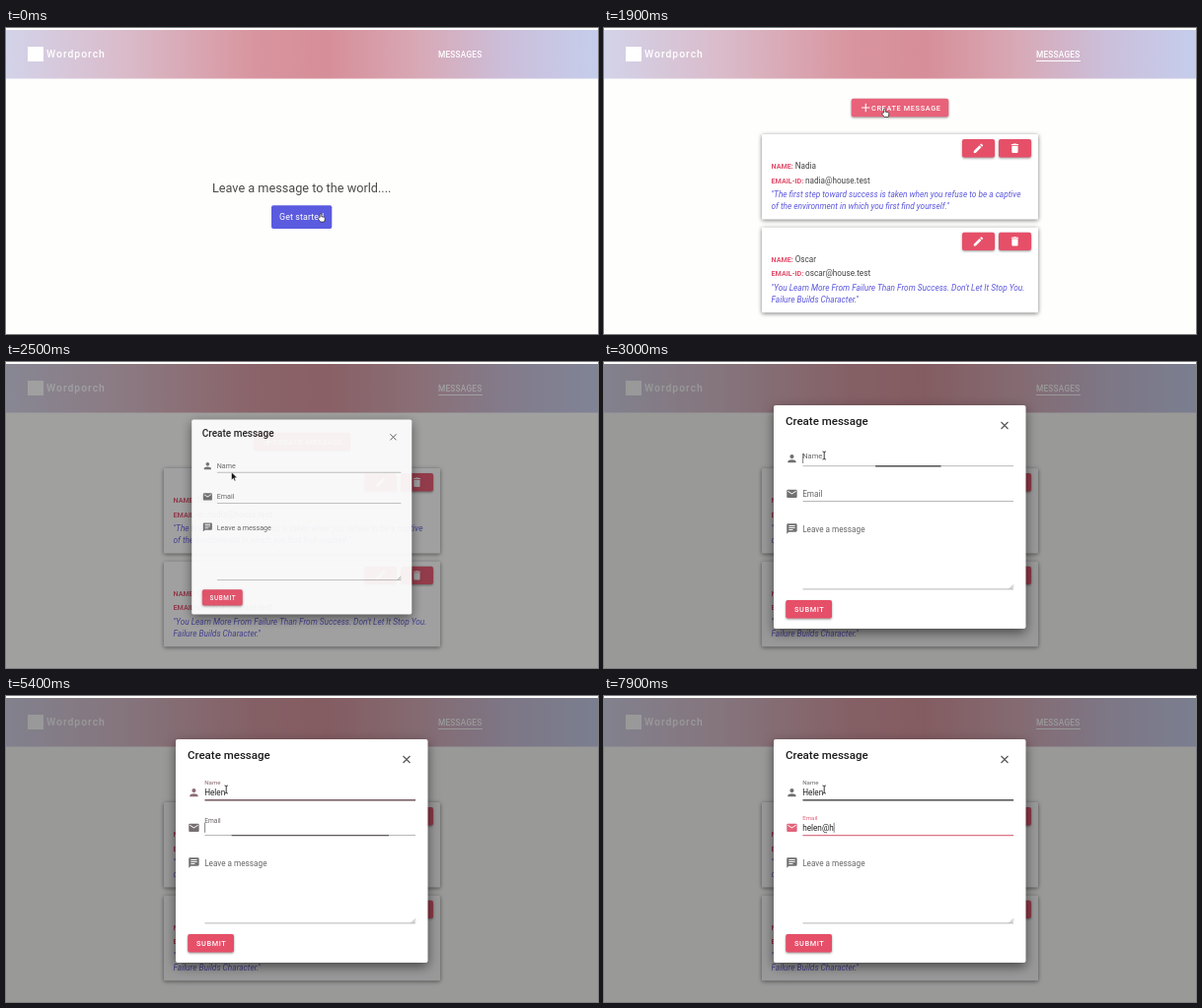
These frames come from a looping animation (600 px wide and 311 px high, 8 s). An HTML page:

```html
<!DOCTYPE html>
<html lang="en">
<head>
<meta charset="utf-8">
<title>Message board</title>
<style>
html, body { margin: 0; height: 100%; overflow: hidden; background: #fefefd; }
svg { display: block; width: 100vw; height: 100vh; font: 8.2px Roboto, sans-serif; }
.btn { fill: #e64f68; filter: drop-shadow(0 1px 1px #0006); }
.caps { font-size: 7.3px; font-weight: 500; letter-spacing: .0892em; fill: #fff; }
.card { fill: #fff; filter: drop-shadow(0 1px 2px #0008); }
.key { font-size: 7.2px; font-weight: 700; fill: #e0506c; }
.val { fill: #444; }
.quote { font-size: 8.3px; font-style: italic; fill: #5a56dc; }
.label { fill: #666; }
.icon { fill: #707070; fill-rule: evenodd; }
.white { fill: #fff; }
</style>
</head>
<body>
<svg viewBox="0 0 600 311" preserveAspectRatio="none">
  <defs>
    <linearGradient id="sky">
      <stop offset="0" stop-color="#d3d3e9"/>
      <stop offset=".2" stop-color="#dabbca"/>
      <stop offset=".42" stop-color="#d8959f"/>
      <stop offset=".54" stop-color="#d68e98"/>
      <stop offset=".7" stop-color="#d8a9b6"/>
      <stop offset=".85" stop-color="#cbbfdb"/>
      <stop offset="1" stop-color="#c5cdec"/>
    </linearGradient>
    <path id="pencil" d="M20.7 7a1 1 0 0 0 0-1.400l-2.300-2.300a1 1 0 0 0-1.400 0l-1.900 1.800 3.800 3.800zM3 17.200V21h3.800L17.800 9.900 14 6.200z"/>
    <path id="bin" d="M19 4h-3.500l-1-1h-5l-1 1H5v2h14zM6 19a2 2 0 0 0 2 2h8a2 2 0 0 0 2-2V7H6z"/>
    <path id="person" d="M12 4a4 4 0 0 1 0 8 4 4 0 0 1 0-8zM12 14c4.400 0 8 1.800 8 4v2H4v-2c0-2.200 3.600-4 8-4z"/>
    <path id="mail" d="M20 4H4a2 2 0 0 0-2 2v12a2 2 0 0 0 2 2h16a2 2 0 0 0 2-2V6a2 2 0 0 0-2-2zM20 8l-8 5-8-5V6l8 5 8-5z"/>
    <path id="chat" d="M20 2H4a2 2 0 0 0-2 2v18l4-4h14a2 2 0 0 0 2-2V4a2 2 0 0 0-2-2zM6 5h12v2H6zM6 9h12v2H6zM6 13h8v2H6z"/>
  </defs>

  <rect width="600" height="311" fill="#fefefd"/>
  <rect y="2" width="600" height="49.500" fill="url(#sky)"/>
  <rect x="22" y="19" width="16" height="15" fill="#fff"/>
  <text x="41" y="30" font-size="10.400" font-weight="500" letter-spacing="1" class="white">Wordporch</text>
  <text x="438" y="29.700" font-size="8.300" font-weight="500" letter-spacing=".2" class="white">MESSAGES</text>

  <g id="home">
    <text x="209" y="167.300" font-size="12.700" fill="#4a4a4a">Leave a message to the world....</text>
    <rect x="269" y="180.300" width="61.300" height="23.700" rx="2" fill="#5b5be0"/>
    <text x="277" y="195.200" font-size="8.800" letter-spacing=".15" class="white">Get started</text>
  </g>

  <g id="list">
    <path d="M438 33.500h45" stroke="#fff"/>
    <rect id="create" x="250.700" y="71.700" width="98.500" height="18.600" rx="2" class="btn"/>
    <path d="M261 81h8.500M265.250 76.750v8.500" stroke="#fff" stroke-width="1.100"/>
    <text x="271" y="83.600" class="caps">CREATE MESSAGE</text>
    <g id="cards"></g>
  </g>

  <rect id="shade" y="2" width="600" height="309" fill="#212121"/>

  <g id="dialog">
    <rect x="172" y="44" width="255.500" height="227" rx="2" fill="#fff" style="filter:drop-shadow(0 4px 6px #0008)"/>
    <text x="184" y="64.300" font-size="11.500" font-weight="500" fill="#1c1c1c">Create message</text>
    <path d="M402.500 61l7 7m0-7l-7 7" stroke="#555" stroke-width="1.100"/>
    <g id="fields"></g>
    <use href="#chat" class="icon" transform="translate(184.200 163.300) scale(.52)"/>
    <text x="201.200" y="172.600" class="label">Leave a message</text>
    <path d="M201.500 230.900H415" stroke="#999" stroke-width=".7"/>
    <path d="M411 230.500l4-4m-2 4l2-2" stroke="#777" stroke-width=".6"/>
    <rect x="184.200" y="242" width="46.800" height="18.600" rx="2" class="btn"/>
    <text x="193" y="253.900" class="caps">SUBMIT</text>
  </g>

  <g id="cursor" stroke-linejoin="round">
    <path id="hand" d="M-.8 4V.8a.8.8 0 0 1 1.600 0v2.400l2.800.6q.9.3.7 1.400l-.6 3.300h-4L-2.700 5.400q-.3-1.100.7-.8z" fill="#fff" stroke="#222" stroke-width=".7"/>
    <path id="arrow" d="M0 0v8l1.900-1.700L3.200 9l1.200-.6-1.200-2.600 2.500-.2z" fill="#111" stroke="#fff" stroke-width=".5"/>
    <path id="beam" d="M-1.700-4Q0-4 0-3Q0-4 1.700-4M0-3V3M-1.700 4Q0 4 0 3Q0 4 1.700 4" fill="none" stroke="#222" stroke-width=".9"/>
  </g>
</svg>
<script>
const LOOP = 8000, STEP = 100;
const $ = id => document.getElementById(id);
const show = (id, on) => $(id).setAttribute('visibility', on ? 'visible' : 'hidden');
const clamp = v => Math.max(0, Math.min(1, v));
const easeOut = v => 1 - (1 - clamp(v)) ** 3;
const GREY = [102, 102, 102], DARK = [60, 60, 60], PINK = [226, 98, 122];
const mix = (a, b, p) => `rgb(${a.map((v, i) => Math.round(v + (b[i] - v) * p))})`;

function card(y, name, mail, line1, line2) {
  const button = (x, icon) => `<rect x="${x}" y="5" width="33" height="18.400" rx="2" class="btn"/>
    <use href="#${icon}" class="white" transform="translate(${x + 10.2} 8) scale(.52)"/>`;
  return `<g transform="translate(0 ${y})">
    <rect x="160" width="280" height="86.600" rx="1" class="card"/>
    ${button(363, 'pencil')}${button(400, 'bin')}
    <text x="169.500" y="35" class="key">NAME:</text><text x="193.700" y="35" class="val">${name}</text>
    <text x="169.500" y="49.500" class="key">EMAIL-ID:</text><text x="204" y="49.500" class="val">${mail}</text>
    <text x="169.500" y="64.300" class="quote">${line1}</text>
    <text x="169.500" y="76.200" class="quote">${line2}</text></g>`;
}
$('cards').innerHTML =
  card(108, 'Nadia', 'nadia@house.test',
    '"The first step toward success is taken when you refuse to be a captive',
    'of the environment in which you first find yourself."') +
  card(202.7, 'Oscar', 'oscar@house.test',
    '"You Learn More From Failure Than From Success. Don\'t Let It Stop You.',
    'Failure Builds Character."');

// keys: the moment each letter of the text is typed
const fields = [
  { label: 'Name', icon: 'person', y: 101, text: 'Helen', focus: 2965, blur: 5290,
    keys: [3900, 4100, 4400, 4700, 4900] },
  { label: 'Email', icon: 'mail', y: 136.8, text: 'helen@h', focus: 5290, blur: LOOP + 1000,
    keys: [5500, 5600, 5800, 5900, 6100, 6600, 7700] }
];
for (const f of fields) {
  const g = document.createElementNS('http://www.w3.org/2000/svg', 'g');
  g.innerHTML = `<use href="#${f.icon}" class="icon" transform="translate(184.200 ${f.y - 9.1}) scale(.52)"/>
    <text x="201.200"></text>
    <text x="201.200" y="${f.y}" fill="#222"></text>
    <path d="M201.500 ${f.y + 4.7}H415" stroke="#999" stroke-width=".7"/>
    <path stroke-width="1.100"/><path stroke="#333" stroke-width=".6"/>`;
  $('fields').append(g);
  [f.mark, f.title, f.input, , f.bar, f.caret] = g.children;
  f.title.textContent = f.label;
}

function drawField(f, t) {
  const up = easeOut((t - f.focus) / 300), off = easeOut((t - f.blur) / 300);
  const tint = clamp((t - f.focus - 100) / 200) * (1 - off);
  f.mark.style.fill = mix([112, 112, 112], PINK, tint);
  f.title.setAttribute('y', f.y - 10.7 * up);
  f.title.style.fontSize = 8.2 - 2.05 * up + 'px';
  f.title.style.fill = mix(GREY, PINK, tint);
  const half = 106.8 * up;
  f.bar.setAttribute('d', `M${308.3 - half} ${f.y + 4.9}h${2 * half}`);
  f.bar.setAttribute('stroke', mix(DARK, PINK, tint));

  const typed = f.keys.filter(k => k <= t);
  f.input.textContent = f.text.slice(0, typed.length);
  const since = t - (typed.at(-1) || f.focus);
  const lit = t >= f.focus && t < f.blur && since % 1200 < 600;
  const x = 201.6 + (typed.length ? f.input.getComputedTextLength() : 0);
  f.caret.setAttribute('d', lit ? `M${x} ${f.y - 8}v10` : '');
}

const path = [[0, 319, 188.5], [700, 319, 188.5], [1700, 284.5, 82], [2400, 284.5, 82],
  [2500, 228.5, 112], [2800, 223.2, 95], [LOOP, 223.2, 95]];
function drawCursor(t) {
  const i = path.findIndex(p => p[0] > t), [t0, x0, y0] = path[i - 1], [t1, x1, y1] = path[i];
  const p = (t - t0) / (t1 - t0), e = p * p * (3 - 2 * p);
  $('cursor').setAttribute('transform', `translate(${x0 + (x1 - x0) * e} ${y0 + (y1 - y0) * e})`);
  const beam = t >= 2800, hand = t < 400 || t >= 1600 && t <= 2400;
  show('hand', hand);
  show('beam', beam);
  show('arrow', !hand && !beam);
}

function draw(now) {
  const t = Math.floor(now % LOOP / STEP) * STEP;
  show('home', t < 400);
  show('list', t >= 400);
  $('create').style.fill = t >= 1600 && t < 2500 ? '#e8627a' : '';
  const open = easeOut((t - 2390) / 300), alpha = clamp(open * 1.25), size = .5 + open / 2;
  $('shade').setAttribute('opacity', .46 * alpha);
  $('dialog').setAttribute('opacity', alpha);
  $('dialog').setAttribute('transform',
    `translate(299.75 157.5) scale(${size}) translate(-299.75 -157.5)`);
  show('dialog', t >= 2400);
  fields.forEach(f => drawField(f, t));
  drawCursor(t);
}

let start;
function tick(now) {
  start ??= now;
  draw(now - start);
  requestAnimationFrame(tick);
}
draw(0);
requestAnimationFrame(tick);
</script>
</body>
</html>
```
